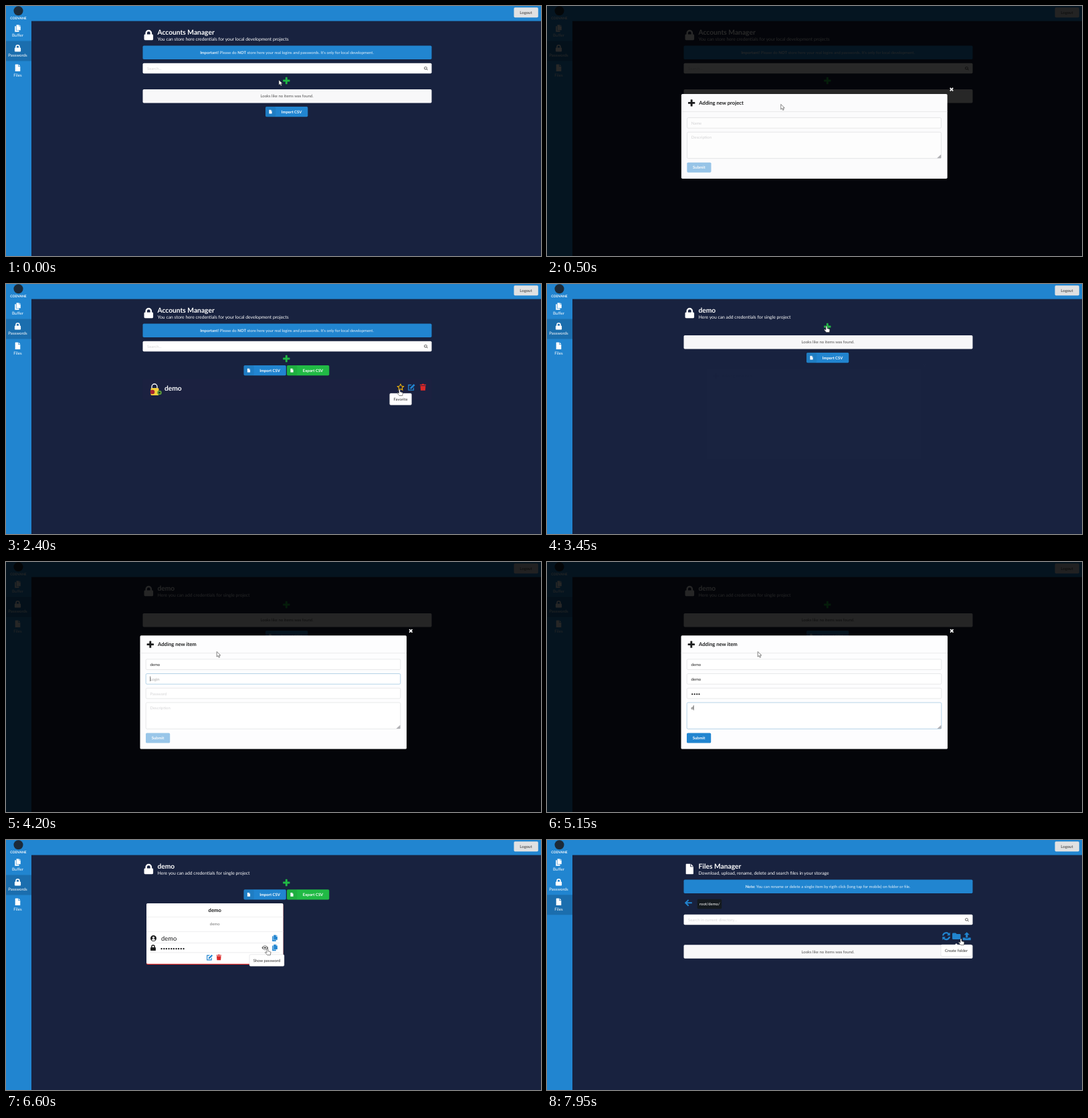
Recreate the animation shown at these times as an HTML page. Size 800x375 px, loop 8 s.

```html
<!DOCTYPE html>
<html lang="en">
<head>
<meta charset="utf-8">
<title>Accounts Manager</title>
<style>
  html, body { margin: 0; width: 100%; height: 100%; overflow: hidden; background: #18223f; }
  svg { display: block; width: 100vw; height: 100vh; font-family: Lato, sans-serif; text-rendering: geometricPrecision; }
  text { white-space: pre; }
</style>
</head>
<body>
<svg id="stage" viewBox="0 0 800 375"></svg>
<script>
const BLUE = '#2185d0', GREEN = '#21ba45', RED = '#db2828', BODY = 5.95;

// Icons are drawn in a 16 x 16 box.
const ICONS = {
  plus: 'M6 1.6q0-.8.8-.8h2.4q.8 0 .8.8V6h4.4q.8 0 .8.8v2.4q0 .8-.8.8H10v4.4q0 .8-.8.8H6.8q-.8 0-.8-.8V10H1.6q-.8 0-.8-.8V6.8q0-.8.8-.8H6z',
  lock: 'M3 7V5a5 5 0 0 1 10 0V7h.5A1.5 1.5 0 0 1 15 8.5v6a1.5 1.5 0 0 1-1.5 1.5h-11A1.5 1.5 0 0 1 1 14.5v-6A1.5 1.5 0 0 1 2.5 7zM5.5 7h5V5a2.5 2.5 0 0 0-5 0z',
  file: 'M2.2.8Q2.2 0 3 0h6v4.7h4.8v10.5q0 .8-.8.8H3q-.8 0-.8-.8zM10 0l3.8 3.8H10z',
  copy: 'M5 0h6v3.5h3.5V12H5zM12 0l2.5 2.5H12zM4 3H1.5v13H11v-3H4z',
  search: 'M6.5 0a6.5 6.5 0 1 0 3.8 11.7l4 4 1.6-1.6-4-4A6.5 6.5 0 0 0 6.5 0zM6.5 2.4a4.1 4.1 0 1 1 0 8.2 4.1 4.1 0 0 1 0-8.2z',
  star: 'M8 0l2.5 5 5.5.8-4 3.9 1 5.5L8 12.6l-5 2.6 1-5.5-4-3.9L5.500 5zM8 3.200L6.500 6.300l-3.300.5 2.400 2.300-.6 3.300L8 10.800l3 1.600-.6-3.300 2.400-2.300-3.300-.5z',
  edit: 'M2 2.500h6.500L7 4.300H2.800v9h8.700V10l1.800-1.800V15H1V2.500zM5.500 8.700l7.300-7.300 2.600 2.600-7.300 7.300-3 .4z',
  trash: 'M2 5h12l-.8 11H2.800zM1 2h4.200l1-1.500h3.600l1 1.500H15v2H1z',
  eye: 'M0 8q8-11 16 0q-8 11-16 0zM8 3.800a4.200 4.200 0 1 0 0 8.400 4.200 4.200 0 0 0 0-8.400zM8 5.400a2.600 2.600 0 1 1 0 5.200 2.600 2.600 0 0 1 0-5.200z',
  user: 'M8 0a8 8 0 1 0 0 16A8 8 0 0 0 8 0zM8 3a2.900 2.900 0 1 1 0 5.800A2.900 2.900 0 0 1 8 3zM3 12.500q1-3 5-3t5 3q-2 2-5 2t-5-2z',
  close: 'M1.500 4.300l2.800-2.800L8 5.200l3.700-3.700 2.800 2.800L10.800 8l3.700 3.700-2.800 2.800L8 10.800l-3.700 3.700-2.800-2.800L5.200 8z',
  back: 'M0 8L7.500.5l2 2-4 4H16v3H5.500l4 4-2 2z',
  folder: 'M0 3.500Q0 2 1.500 2h5l2 2h6Q16 4 16 5.500v7q0 1.500-1.500 1.500h-13Q0 14 0 12.500z',
  upload: 'M8 0l5.500 5.500H10V11H6V5.500H2.500zM0 11h5v1.500h6V11h5v5H0z',
  refresh: 'M0 7A8 8 0 0 1 13.600 2.300l2-2v6.300H9.300l2.200-2.200A5 5 0 0 0 3 7zM16 9A8 8 0 0 1 2.400 13.700l-2 2V9.400h6.300l-2.200 2.200A5 5 0 0 0 13 9z'
};

const group = (id, content, attrs = '') => `<g id="${id}" ${attrs}>${content}</g>`;
const rect = (x, y, w, h, fill, r = 1.7, attrs = '') =>
  `<rect x="${x}" y="${y}" width="${w}" height="${h}" rx="${r}" fill="${fill}" ${attrs}/>`;
const label = (x, y, content, size = BODY, fill = '#fff', attrs = '') =>
  `<text x="${x}" y="${y}" font-size="${size}" fill="${fill}" ${attrs}>${content}</text>`;
const MID = 'text-anchor="middle"', BOLD = 'font-weight="700"';
const centered = (x, y, content, size, fill, attrs = '') => label(x, y, content, size, fill, MID + ' ' + attrs);
const icon = (name, cx, cy, size, fill = '#fff') =>
  `<path d="${ICONS[name]}" fill="${fill}" fill-rule="${name === 'edit' ? 'nonzero' : 'evenodd'}" transform="translate(${cx - size / 2} ${cy - size / 2}) scale(${size / 16})"/>`;
const rule = (x, y, w, color = '#dfdfe2') => rect(x, y, w, .6, color, 0);

const heading = (name, title, subtitle) =>
  icon(name, 213.300, 43.500, 15.500) + label(226.500, 43.300, title, 10.250, '#fff', BOLD) + label(226.500, 52.200, subtitle, 6.800);
const notice = (bold, rest) =>
  rect(204.500, 59.500, 432, 20.500, BLUE) + centered(420, 72.200, `<tspan ${BOLD}>${bold}</tspan> ${rest}`, BODY, '#e4f1fb');
const searchBox = (y, hint) =>
  rect(204.500, y, 432, 15.500, '#fff') + label(211, y + 10, hint, BODY, '#d6d6d8') + icon('search', 628, y + 8, 5.600, '#555');
const emptyNote = y =>
  rect(204.500, y, 432, 20.500, '#f8f8f9') + centered(420, y + 12.400, 'Looks like no items was found.', BODY, '#555');
const csvButton = (x, y, text, fill) =>
  rect(x, y, 63.300, 15.200, fill) + rect(x, y, 15.200, 15.200, 'rgba(0,0,0,.06)') +
  icon('file', x + 7.500, y + 7.600, 5.800) + centered(x + 39, y + 9.800, text, BODY, '#fff', BOLD);
const csvPair = y => csvButton(355.500, y, 'Import CSV', BLUE) + csvButton(420, y, 'Export CSV', GREEN);
const tooltip = (id, x, y, w, pointerX, text) =>
  group(id, `<path d="M${pointerX - 2.500} ${y + .5}l2.500-2.500 2.500 2.500z" fill="#fff"/>` +
    rect(x, y, w, 17.500, '#fff', 1.700, 'stroke="#c9cace" stroke-width=".4"') +
    centered(x + w / 2, y + 10.700, text, BODY, '#333'));

const navItem = (y, name, text) => icon(name, 17.500, y, 10.500) + centered(17.500, y + 12.700, text, 6.150);
const frame =
  rect(0, 0, 800, 375, '#18223f', 0) + rect(0, 0, 800, 22.600, BLUE, 0) + rect(0, 0, 38, 375, BLUE, 0) +
  rect(0, 52.500, 38, 30, '#1b6eae', 0, 'id="active"') +
  '<circle cx="18.500" cy="7.200" r="7" fill="#1c2a38"/>' + centered(18.500, 19.900, 'CODVANE', 5, '#fff', BOLD) +
  navItem(33.500, 'copy', 'Buffer') + navItem(63.200, 'lock', 'Passwords') + navItem(92.800, 'file', 'Files') +
  rect(759.500, 2.300, 36.300, 15, '#e0e1e2') + centered(777.500, 11.900, 'Logout', BODY, '#606162', BOLD);

const accounts = heading('lock', 'Accounts Manager', 'You can store here credentials for your local development projects') +
  notice('Important!', 'Please do <tspan font-weight="700">NOT</tspan> store here your real logins and passwords. It\'s only for local development.') +
  searchBox(85.700, 'Search...') + icon('plus', 419.300, 112, 11.500, GREEN);
const project = heading('lock', 'demo', 'Here you can add credentials for single project') + icon('plus', 419.300, 64, 11.500, GREEN);
const padlock = '<path d="M218 157v-3a4 4 0 0 1 8 0v3" fill="none" stroke="#fff" stroke-width="1.300"/>' +
  rect(216.500, 156, 12, 11, '#f4cf3c', 1.500) +
  '<circle cx="219" cy="162" r="3.300" fill="#a8262e"/><circle cx="229.500" cy="163" r="3.300" fill="#5c9a3a"/><circle cx="229.500" cy="163" r="1.300" fill="#222"/>';
const card =
  rect(210, 96, 204.500, 91, RED) + rect(210, 95, 204.500, 90.800, '#fff') +
  centered(312.200, 107.600, 'demo', 7.700, '#1b1c1d', BOLD) + rule(210, 115.300, 204.500, '#e6e6e8') +
  centered(312.200, 128, 'demo', BODY, '#777') + rule(210, 137, 204.500, '#e6e6e8') +
  icon('user', 220.500, 147.500, 9, '#1b1c1d') + label(232, 150.800, 'demo', 9.400, '#1b1c1d') +
  icon('copy', 402, 147.300, 9.500, BLUE) + rule(215, 154.300, 194) +
  icon('lock', 220, 161.500, 9, '#1b1c1d') + label(230.800, 164.500, '••••••••••', 6.300, '#1b1c1d') +
  icon('eye', 387.300, 161.700, 10, '#666') + icon('copy', 402, 161.500, 9.500, BLUE) + rule(215, 168.600, 194) +
  icon('edit', 304.500, 176, 10, BLUE) + icon('trash', 318.300, 175.800, 8.800, RED);

const pages = [
  { start: 0, content: accounts + emptyNote(125) + csvButton(388, 151, 'Import CSV', BLUE) },
  { start: 1760, content: accounts + csvPair(122) + rect(204.500, 142.500, 432, 31, '#1b2140') + padlock +
      label(237, 160.300, 'demo', 10.250, '#fff', BOLD) + icon('star', 590, 154.800, 11.500, '#fbbd08') +
      icon('edit', 606.300, 154.800, 11.500, BLUE) + icon('trash', 623.500, 154.600, 10.500, RED) },
  { start: 2900, content: project + emptyNote(77) + csvButton(388, 103, 'Import CSV', BLUE) },
  { start: 6320, content: project + csvPair(74.300) + card },
  { start: 7250, content: heading('file', 'Files Manager', 'Download, upload, rename, delete and search files in your storage') +
      notice('Note:', 'You can rename or delete a single item by rigth click (long tap for mobile) on folder or file.') +
      icon('back', 211.300, 94.300, 11, BLUE) + rect(224.700, 88.700, 36.500, 14.500, '#141a1f') + label(228, 98.300, 'root/demo/', BODY) +
      searchBox(111.800, 'Search in current directory...') + icon('refresh', 597, 144.200, 12, BLUE) +
      icon('folder', 612.300, 144.200, 12.500, BLUE) + icon('upload', 627.700, 144.200, 12, BLUE) + emptyNote(157.300) }
];

const tips = [
  { id: 'tipFavorite', start: 2290, end: 2600, svg: [573.700, 164, 32.800, 590, 'Favorite'] },
  { id: 'tipPassword', start: 6500, end: 6800, svg: [364, 171.800, 52, 390, 'Show password'] },
  { id: 'tipFolder', start: 7760, end: 8100, svg: [589, 157, 46, 612, 'Create folder'] }
];

// Each modal grows downwards from top; fields are typed between focus and blur.
const modals = [
  { id: 'projectModal', top: 132, height: 127, title: 'Adding new project', open: 180, close: 1680, enabled: 900, hover: 1530, fields: [
    { hint: 'Name', value: 'demo', focus: 700, type: 780, blur: 1080 },
    { hint: 'Description', value: 'demo', focus: 1080, type: 1120, blur: 1500, area: true }] },
  { id: 'itemModal', top: 110.300, height: 170.300, title: 'Adding new item', open: 3440, close: 6200, enabled: 4850, hover: 5680, fields: [
    { hint: 'Name', value: 'demo', focus: 3780, type: 3850, blur: 4150 },
    { hint: 'Login', value: 'demo', focus: 4150, type: 4380, blur: 4680 },
    { hint: 'Password', value: '••••', focus: 4680, type: 4750, blur: 5080 },
    { hint: 'Description', value: 'demo', focus: 5080, type: 5150, blur: 5600, area: true }] }
];

function modalMarkup(modal) {
  const { top, height } = modal;
  let y = top + 35.500;
  let svg = rect(200.500, top, 398.500, height, '#fdfdfe') + icon('plus', 215.800, top + 13.300, 11.500, '#1b1c1d') +
    label(227, top + 15.800, modal.title, 7.700, '#1b1c1d', BOLD) + rule(200.500, top + 26.200, 398.500) +
    icon('close', 605.300, top - 7, 7);
  modal.fields.forEach((field, i) => {
    const key = modal.id + i, h = field.area ? 39.500 : 15.700;
    svg += rect(209.200, y, 380.600, h, '#fff', 1.700, `id="${key}Box" stroke-width=".6"`) +
      label(215.500, y + 10.300, '', BODY, '#222', `id="${key}"`) + rect(215.500, y + 4, .6, 7.500, '#222', 0, `id="${key}Caret"`);
    if (field.area) svg += `<path d="M589.500 ${y + h - 6}v5.700h-6z" fill="#b0b0b4"/>`;
    y += h + 6;
  });
  return group(modal.id, svg + group(modal.id + 'Submit',
    rect(209, y, 36.200, 15.200, BLUE, 1.700, `id="${modal.id}Button"`) + centered(227.100, y + 9.800, 'Submit', BODY, '#fff', BOLD)));
}

const outline = 'stroke="#333" stroke-width=".6" stroke-linejoin="round"';
document.getElementById('stage').innerHTML = frame +
  pages.map((page, i) => group('page' + i, page.content)).join('') +
  tips.map(tip => tooltip(tip.id, ...tip.svg)).join('') +
  rect(0, 0, 800, 375, '#000', 0, 'id="dimmer"') + modals.map(modalMarkup).join('') +
  group('pointer',
    `<path id="arrow" d="M0 0v7.600l1.800-1.600 1.200 2.800 1.400-.6-1.200-2.700h2.400z" fill="#fff" ${outline}/>` +
    `<path id="hand" d="M-1 1a1 1 0 0 1 2 0v2.800l3 .7q1.100.3.900 1.600L4.300 9.500H-.3L-3.400 6q-.3-1.200.9-1l1.500 1z" fill="#fff" ${outline}/>`);

const $ = id => document.getElementById(id);
const set = (id, attrs) => { for (const name in attrs) $(id).setAttribute(name, attrs[name]); };
const show = (id, visible) => set(id, { display: visible ? 'inline' : 'none' });
const clamp = v => Math.max(0, Math.min(1, v));
const smooth = v => v * v * (3 - 2 * v);
const within = (t, [from, to]) => t >= from && t < to;
// Fades in after start and out after end.
const fade = (t, start, end, duration) =>
  smooth(Math.min(clamp((t - start) / duration), 1 - clamp((t - end) / duration)));

const path = [
  [0, 408, 111], [110, 418, 111], [280, 418, 111], [680, 300, 174], [1330, 300, 174], [1570, 215, 247], [1740, 215, 247],
  [2280, 588.500, 158], [2480, 588.500, 158], [2820, 250, 155], [2920, 250, 155], [3340, 418, 63], [3480, 418, 63],
  [3760, 316, 152], [3850, 316, 152], [4000, 315.200, 134.500], [5520, 315.200, 134.500], [5750, 223, 261], [6220, 223, 261],
  [6540, 391, 163], [6750, 391, 163], [7150, 18, 97], [7270, 18, 97], [7740, 609, 145], [7950, 619, 148], [8000, 620, 148]
];
const handTimes = [[80, 340], [1530, 1820], [2230, 2540], [2780, 2960], [3310, 3540], [5690, 6270], [6510, 6790], [7060, 7330], [7690, 8000]];

function pointerAt(t) {
  const i = path.findIndex(point => point[0] > t);
  const [t0, x0, y0] = path[i - 1], [t1, x1, y1] = path[i];
  const k = smooth((t - t0) / (t1 - t0));
  return [x0 + (x1 - x0) * k, y0 + (y1 - y0) * k];
}

function drawField(field, key, t) {
  const count = Math.max(0, Math.min(4, Math.floor((t - field.type) / 65) + 1));
  const focused = within(t, [field.focus, field.blur]);
  const text = $(key), value = count ? field.value.slice(0, count) : field.hint;
  if (text.textContent !== value) text.textContent = value;
  set(key, { fill: count ? '#222' : focused ? '#aaa' : '#d4d4d6' });
  set(key + 'Box', { stroke: focused ? '#85b7d9' : '#d9dadc' });
  show(key + 'Caret', focused && t % 1000 < 550);
  if (focused) set(key + 'Caret', { x: 215.500 + (count ? text.getComputedTextLength() : 0) });
}

function draw(t) {
  const current = pages.filter(page => page.start <= t).length - 1;
  pages.forEach((_, i) => show('page' + i, i === current));
  set('active', { y: current === 4 ? 82.300 : 52.500 });
  tips.forEach(tip => set(tip.id, { opacity: fade(t, tip.start, tip.end, 100) }));

  let shade = 0;
  modals.forEach(modal => {
    const k = fade(t, modal.open, modal.close, 340), scale = .8 + .2 * k;
    const cy = modal.top + modal.height / 2;
    shade = Math.max(shade, k);
    show(modal.id, k > 0);
    set(modal.id, { opacity: k, transform: `translate(400 ${cy}) scale(${scale}) translate(-400 ${-cy})` });
    set(modal.id + 'Submit', { opacity: t < modal.enabled ? .45 : 1 });
    set(modal.id + 'Button', { fill: t >= modal.hover ? '#1a6cab' : BLUE });
    if (k > 0) modal.fields.forEach((field, i) => drawField(field, modal.id + i, t));
  });
  set('dimmer', { opacity: .85 * shade });

  const hand = handTimes.some(span => within(t, span));
  show('hand', hand);
  show('arrow', !hand);
  set('pointer', { transform: `translate(${pointerAt(t)})` });
}

const begin = performance.now();
function tick() {
  draw((performance.now() - begin) % 8000);
  requestAnimationFrame(tick);
}
tick();
</script>
</body>
</html>
```
